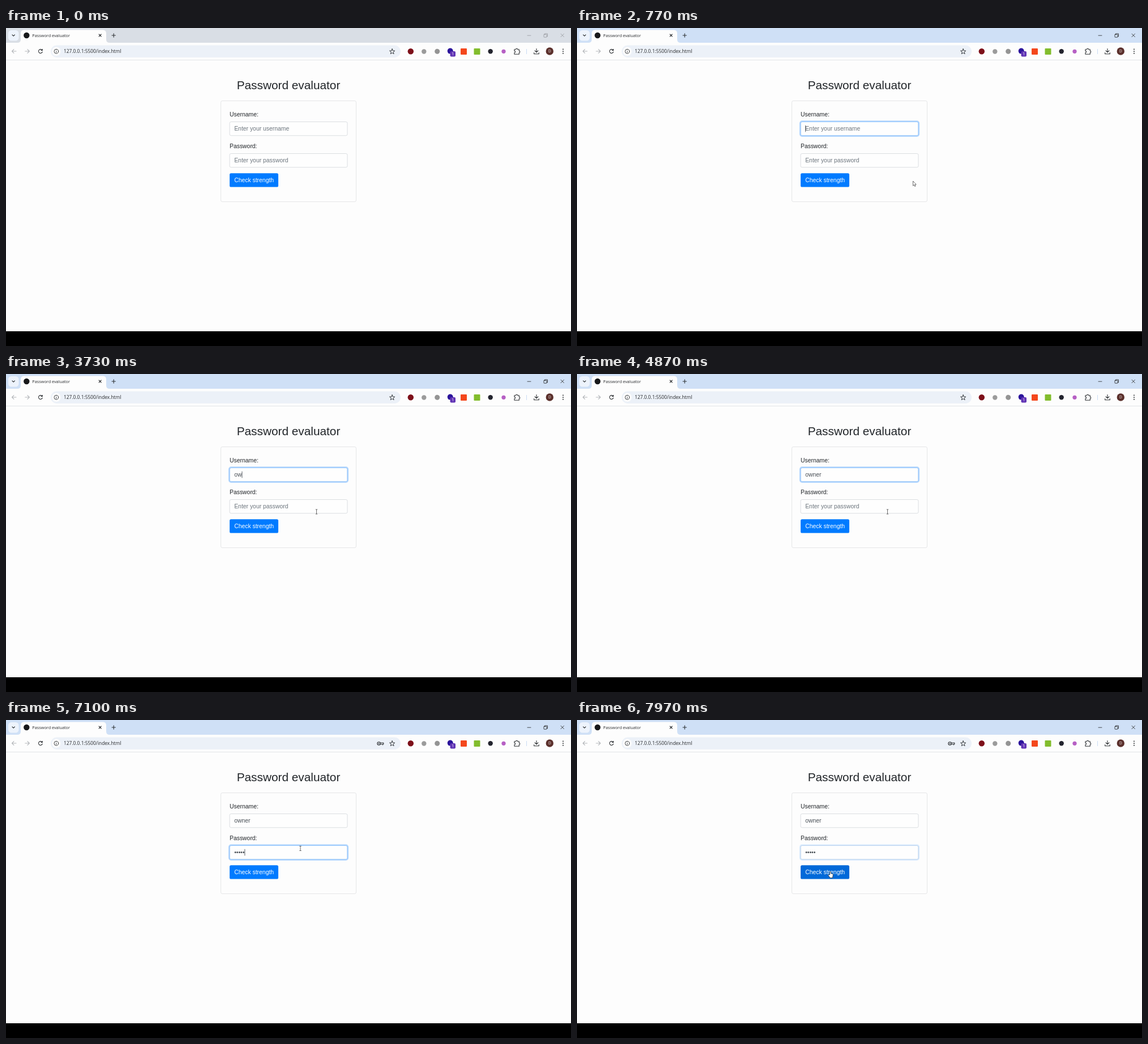
An HTML page for the animation above (8000 ms loop, 998 px wide and 561 px high).

```html
<!DOCTYPE html>
<html lang="en">
<head>
<meta charset="utf-8">
<title>Password evaluator</title>
<style>
html, body { margin: 0; width: 100%; height: 100%; overflow: hidden; background: #fdfdfd; }
svg { display: block; width: 998px; height: 561px; }
text { font-family: "Liberation Sans", Arial, sans-serif; font-size: 10.4px; fill: #212529; white-space: pre; }
.ui { font-family: "Open Sans", "Noto Sans", sans-serif; fill: #2a2c2f; }
.line { fill: none; stroke: #2d3033; stroke-width: 1.1; stroke-linecap: round; stroke-linejoin: round; }
.faint { stroke: #b3b6ba; }
.hint { fill: #6c757d; }
.value { fill: #495057; }
.box { fill: #fff; fill-opacity: .6; stroke: #d2d6da; stroke-width: .8; }
.ring { fill: none; stroke: #b9d9fd; stroke-width: 2.3; }
.edge { fill: none; stroke: #80bdff; stroke-width: .8; }
</style>
</head>
<body>
<svg viewBox="0 0 998 561">
  <rect width="998" height="561" fill="#fdfdfd"/>

  <!-- tab strip -->
  <rect id="strip" width="998" height="26"/>
  <rect x="4" y="4" width="18.5" height="18.5" rx="5.5" fill="#edf3fc"/>
  <path class="line" d="M11 12l2.2 2.2 2.2-2.2"/>
  <path fill="#fdfdfd" d="M20 26q6 0 6-6V9.500q0-6 6-6H171q6 0 6 6V20q0 6 6 6Z"/>
  <circle cx="36.300" cy="13" r="5.200" fill="#17181a"/>
  <text class="ui" x="46.300" y="15.800" style="font-size:7.3px">Password evaluator</text>
  <path class="line" d="M164.200 11l4 4m0-4l-4 4M187 13h6.400m-3.200-3.200v6.400"/>
  <g id="controls" class="line" style="stroke-width:.8">
    <path d="M921 13.200h6M980 10.200l5.500 5.500m0-5.500l-5.500 5.500M951.500 11.200V10h5v5h-1.200"/>
    <rect x="950" y="11.300" width="5" height="5" rx=".6"/>
  </g>

  <!-- toolbar -->
  <path d="M0 56.500H998" stroke="#e1e4e8"/>
  <path class="line faint" d="M18 41h-7.500m3.400-3.400L10.500 41l3.400 3.400M33.800 41h7.500m-3.400-3.400l3.400 3.400l-3.400 3.400"/>
  <path class="line" d="M63.800 39.200a3.400 3.400 0 1 0 .4 2.800M64.300 37.200v2.300H62"/>
  <rect x="79" y="30.500" width="618" height="21.500" rx="10.750" fill="#ecf1f8"/>
  <circle cx="88.800" cy="41.200" r="7.800" fill="#fdfdfd"/>
  <circle class="line" cx="88.800" cy="41.200" r="3.800" style="stroke-width:.9"/>
  <path class="line" d="M88.800 41v2.100m0-4.100v.1" style="stroke-width:.9"/>
  <text class="ui" x="102" y="44.300" style="font-size:8.4px">127.0.0.1:5500/index.html</text>
  <g id="key" class="line">
    <circle cx="658.600" cy="41.500" r="2.700"/>
    <path d="M661.300 40.300h5.500v2.400h-5.500m4 0v1.200"/>
    <circle cx="658.600" cy="41.500" r=".5"/>
  </g>
  <path id="star" class="line" style="stroke-width:.95"/>
  <circle cx="714.800" cy="41.300" r="5.200" fill="#7d1019"/>
  <circle cx="738.300" cy="41.500" r="4.200" fill="#9b9b9b"/>
  <circle cx="761.700" cy="41.300" r="4.500" fill="#949494"/>
  <circle cx="784.700" cy="40.600" r="5" fill="#2b149b"/>
  <rect x="784.500" y="41" width="9.500" height="9.500" rx="2" fill="#6236b5"/>
  <text class="ui" x="789.200" y="48.300" text-anchor="middle" style="font-size:6.8px;fill:#fff">1</text>
  <rect x="803" y="36" width="11" height="11" rx="1" fill="#f4471c"/>
  <rect x="826.500" y="36" width="11" height="11" rx="1" fill="#82bd2d"/>
  <circle cx="855.700" cy="41.300" r="4.200" fill="#23242e"/>
  <circle cx="879" cy="41.300" r="3.600" fill="#b65fc4"/>
  <path class="line" d="M898 37.800h2.600a1.500 1.500 0 0 1 3 0h2.700v2.700a1.500 1.500 0 0 1 0 3v2.700H898v-2.600a1.600 1.600 0 0 0 0-3.200Z"/>
  <path d="M919.500 37v9" stroke="#c9dcf5"/>
  <path class="line" d="M937 36.500v6.300m-2.900-2.800l2.900 2.900l2.900-2.900M932.700 43.500v2.300h8.600v-2.300"/>
  <circle cx="960.300" cy="41" r="6.700" fill="#5b302c"/>
  <text class="ui" x="960.300" y="43.400" text-anchor="middle" style="font-size:6.5px;fill:#f3e9e7">D</text>
  <g fill="#2d3033"><circle cx="984" cy="37.600" r="1"/><circle cx="984" cy="41.200" r="1"/><circle cx="984" cy="44.800" r="1"/></g>

  <!-- page -->
  <text x="499" y="107.700" text-anchor="middle" style="font-size:20.8px">Password evaluator</text>
  <rect x="379.500" y="128.500" width="239" height="178" rx="2.600" fill="none" stroke="#e3e4e5" stroke-width=".9"/>
  <text x="395" y="156">Username:</text>
  <text x="395" y="212">Password:</text>
  <g id="user"></g>
  <g id="pass" transform="translate(0 56)"></g>
  <rect id="button" x="395" y="256.200" width="86" height="24.300" rx="2.600"/>
  <text x="403.200" y="272.200" style="fill:#fff">Check strength</text>
  <rect y="535" width="998" height="26"/>

  <!-- pointer shapes share the hot spot 0,0 -->
  <g id="pointer">
    <path id="arrow" d="M0 0V8.300L1.900 6.600L3.200 9.500L4.500 8.900L3.300 6.100H5.700Z" fill="#fff" stroke="#333" stroke-width=".7"/>
    <path id="beam" d="M-1.700-4H1.700M0-4V4M-1.700 4H1.700" fill="none" stroke="#4a4a4a" stroke-width=".8"/>
    <path id="hand" d="M-.9 1.500V-3.500q.9-1.600 1.800 0V-.8l3 .8q1 .3.900 1.500L4.200 5.200 3.700 7H-.8L-1.300 5.600L-3.600 2.800q-.4-1.500 1-1.300Z" fill="#fff" stroke="#222" stroke-width=".7"/>
  </g>
</svg>

<script>
const LOOP = 8000, FADE = 150, BLINK = 500;
const ACTIVATE = 400, SWITCH = 5300, SUBMIT = 7890;
const NAME = "owner";
const NAME_KEYS = [3350, 3560, 3740, 3950, 4200];
const PASS_KEYS = [5740, 6060, 6330, 6590, 6800];
const PATH = [ // time, x, y
  [100, 640, 540], [400, 615, 400], [700, 593.500, 270], [1750, 593.500, 270],
  [2150, 548.500, 243], [4950, 548.500, 243], [5220, 520, 226.500],
  [7560, 520, 226.500], [7830, 447.500, 271.500]
];

const $ = id => document.getElementById(id);
const clamp = v => Math.max(0, Math.min(1, v));
const fade = (t, start) => clamp((t - start) / FADE);
const show = (el, on) => { el.style.display = on ? "" : "none"; };
const mix = (a, b, k) => `rgb(${a.map((v, i) => Math.round(v + (b[i] - v) * k))})`;

$("star").setAttribute("d", "M" + Array.from({ length: 10 }, (_, i) => {
  const r = i % 2 ? 2.1 : 4.9, a = i * Math.PI / 5;
  return `${(682.2 + r * Math.sin(a)).toFixed(2)} ${(41.7 - r * Math.cos(a)).toFixed(2)}`;
}).join("L") + "Z");

function makeField(id, hint) {
  const g = $(id), rect = 'x="395" y="165.500" width="208" height="24.300" rx="2.600"';
  g.innerHTML = `<rect class="box" ${rect}/>
    <g><rect class="ring" x="394" y="164.500" width="210" height="26.300" rx="3.500"/><rect class="edge" ${rect}/></g>
    <text class="hint" x="403.200" y="181">${hint}</text><text class="value" x="403.200" y="181"></text>
    <rect y="171.800" width=".9" height="11.500" fill="#495057"/>`;
  const [, glow, placeholder, value, caret] = g.children;
  return (text, focus, caretOn) => {
    if (value.textContent !== text) value.textContent = text;
    show(placeholder, !text);
    glow.style.opacity = focus;
    show(caret, caretOn);
    caret.setAttribute("x", 403.2 + (text ? value.getComputedTextLength() : 0));
  };
}

const drawUser = makeField("user", "Enter your username");
const drawPass = makeField("pass", "Enter your password");

function pointerAt(t) {
  const next = PATH.findIndex(p => p[0] > t);
  if (next < 0) return PATH[PATH.length - 1].slice(1);
  if (next === 0) return PATH[0].slice(1);
  const [t0, x0, y0] = PATH[next - 1], [t1, x1, y1] = PATH[next];
  const k = (t - t0) / (t1 - t0), e = k * k * (3 - 2 * k);
  return [x0 + (x1 - x0) * e, y0 + (y1 - y0) * e];
}

function caretOn(t, events) {
  const last = Math.max(...events.filter(e => e <= t));
  return (t - last) % (2 * BLINK) < BLINK;
}

function render(t) {
  const active = t >= ACTIVATE;
  $("strip").setAttribute("fill", active ? "#cfe0f6" : "#d9dee5");
  $("controls").style.stroke = active ? "#222" : "#96999e";

  const nameLength = NAME_KEYS.filter(k => k <= t).length;
  const dots = PASS_KEYS.filter(k => k <= t).length;
  const inUser = active && t < SWITCH, inPass = t >= SWITCH && t < SUBMIT;
  drawUser(NAME.slice(0, nameLength), fade(t, ACTIVATE) - fade(t, SWITCH),
    inUser && caretOn(t, [ACTIVATE, ...NAME_KEYS]));
  drawPass("•".repeat(dots), fade(t, SWITCH) - fade(t, SUBMIT),
    inPass && caretOn(t, [SWITCH, ...PASS_KEYS]));
  show($("key"), dots > 0);

  const [x, y] = pointerAt(t);
  const overField = x > 395 && x < 603 && (y > 165 && y < 190 || y > 221 && y < 246);
  const overButton = x > 395 && x < 481 && y > 256 && y < 281;
  $("pointer").setAttribute("transform", `translate(${x.toFixed(1)} ${y.toFixed(1)})`);
  show($("pointer"), t >= PATH[0][0] && y < 535);
  show($("arrow"), !overField && !overButton);
  show($("beam"), overField);
  show($("hand"), overButton);
  $("button").setAttribute("fill", mix([0, 123, 255], [0, 105, 217], fade(t, 7740)));
}

const start = performance.now();
function tick() {
  render((performance.now() - start) % LOOP);
  requestAnimationFrame(tick);
}
tick();
</script>
</body>
</html>
```
